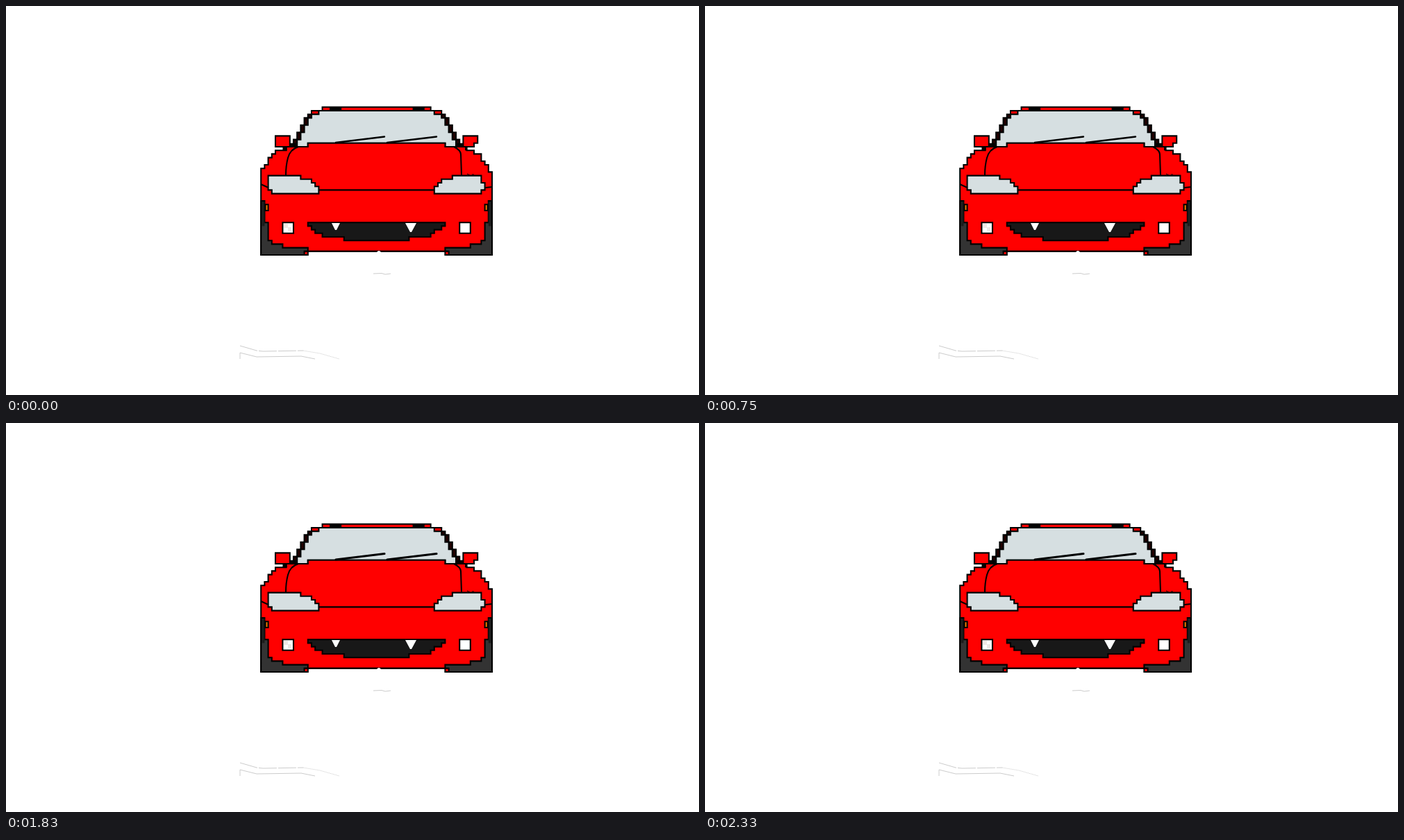
An HTML page for the animation above (2.41 s loop, 998 px wide and 561 px high).

```html
<!DOCTYPE html>
<html lang="en">
<head>
<meta charset="utf-8">
<title>Winking car</title>
<style>
  html, body { margin: 0; width: 100%; height: 100%; overflow: hidden; background: #fff; }
  svg { display: block; width: 998px; height: 561px; }
  .line { fill: none; }
  .red { fill: #f00; }
  .glass { fill: #d6dfe1; }
  .tyre { fill: #333; }
  .faint { fill: none; stroke: #ccc; stroke-width: 1; }
</style>
</head>
<body>
<svg viewBox="0 0 998 561" stroke="#000" stroke-width="2">
  <!-- marks on the ground -->
  <g class="faint">
    <path d="M529 386L541 385.500L546 387L554 386"/>
    <path d="M337 490L361 497L370 498L428 497" stroke-dasharray="26 2"/>
    <path d="M428 497L452 501L480 509" stroke-dasharray="1 1"/>
    <path d="M337 509V500L361 506L425 505L445 509"/>
  </g>

  <!-- the car is drawn on a grid of 64 by 41 cells -->
  <g transform="translate(367.2 145.800) scale(5.2)" stroke-width=".4">
    <!-- roof and windscreen -->
    <path fill="#200" d="M17 0H47V1H50V2H51V3H52V5H53V7H54V9H55V11H9V9H10V7H11V5H12V3H13V2H14V1H17Z"/>
    <path class="red" stroke="none" d="M17.200 .2H46.800V.8H17.200ZM14.200 1.200H15.800V1.800H14.200ZM48.200 1.200H49.800V1.800H48.200Z"/>
    <path stroke="none" d="M19 0H22.300V1H19ZM42 0H45.300V1H42Z"/>
    <path class="glass" d="M16 1H48V2H50V3H51V5H52V7H53V9H54V11H51V10H13V11H10V9H11V7H12V5H13V3H14V2H16Z"/>

    <!-- body -->
    <path class="red" d="M13 10H51V11H57V12H59V13H61V15H62V16H63V18H64V41H51V40H13V41H0V17H1V16H2V14H3V13H4V12H7V11H13Z"/>
    <path class="red" d="M4 8H8V11H4ZM56 8H60V10H59V11H56Z"/>
    <path stroke="none" d="M6 11H7.200V12H6ZM8 10H10V11H8ZM54 10H56V11H54ZM56.500 11H57V12H56.500Z"/>
    <path class="line" d="M16 23H48"/>
    <path id="lamp" class="glass"/>
    <path class="glass" d="M53 19H61V21H62V23H61V24H48V22H49V21H50V20H53Z"/>

    <!-- one side, mirrored for the other -->
    <g id="side">
      <path class="tyre" d="M0 26H1V32H2V37H3V38H6V39H13V40H12V41H0Z"/>
      <path fill="#1c1c1c" stroke="none" d="M.2 26.200H1V33H.2Z"/>
      <path fill="#e87800" d="M1.200 27H2V28.700H1.200Z"/>
      <path class="line" d="M12 40H32"/>
      <path fill="#fff" d="M6 32H9V35H6Z"/>
    </g>
    <use href="#side" transform="matrix(-1 0 0 1 64 0)"/>

    <!-- grille -->
    <path fill="#181818" d="M13 32H51V33H50V34H48V35H47V36H41V37H23V36H17V35H15V34H14V33H13Z"/>
  </g>

  <!-- freehand details -->
  <path class="line" d="M367 257L378 262M690 262L700 261M645 203Q655 208 655 214L656 244"/>
  <path class="line" stroke-width="1" d="M664 242L668 244M671 243H674"/>
  <path id="seam" class="line"/>
  <path fill="#eee8e6" stroke="none" d="M400 314H406V319H411V325H406V320H400Z"/>
  <path fill="#fff" stroke="none" d="M534 355Q537 351 540 355ZM469 313H481L476 323H474ZM575 313H591L584 326H582Z"/>
  <path id="wipers" class="line" stroke-linecap="round"/>
</svg>
<script>
const LOOP = 2410, STEP = 1000 / 12;
const lamps = [
  "M2 19H11V20H14V21H15V22H16V24H3V23H2Z",
  "M2 21H15V22H16V24H3V23H2Z",
  "M3 22.500H7.800L8 22.100H16V24H3Z"
];
const down = [475, 197, 545, 188.5, 549, 197, 620, 188.5];
const up = [479, 197, 490, 154, 553, 197, 575, 154];
const set = (id, name, value) => document.getElementById(id).setAttribute(name, value);
const clamp = (v, max) => Math.max(0, Math.min(max, v));

function draw() {
  const step = Math.floor((performance.now() % LOOP + 7) / STEP);

  const lid = clamp(3 - Math.abs(step - 5), 2);
  set("lamp", "d", lamps[lid]);
  set("seam", "d", `M421 203Q409 207 406 219Q403 230 403 ${lid > 1 ? 241 : 244}`);

  const raise = clamp((6 - Math.abs(step - 15)) / 2, 1);
  const p = down.map((v, i) => v + (up[i] - v) * raise);
  set("wipers", "d", `M${p.slice(0, 4)}M${p.slice(4)}`);
  set("wipers", "stroke-width", step < 22 ? 2.4 : 3);

  requestAnimationFrame(draw);
}
draw();
</script>
</body>
</html>
```
